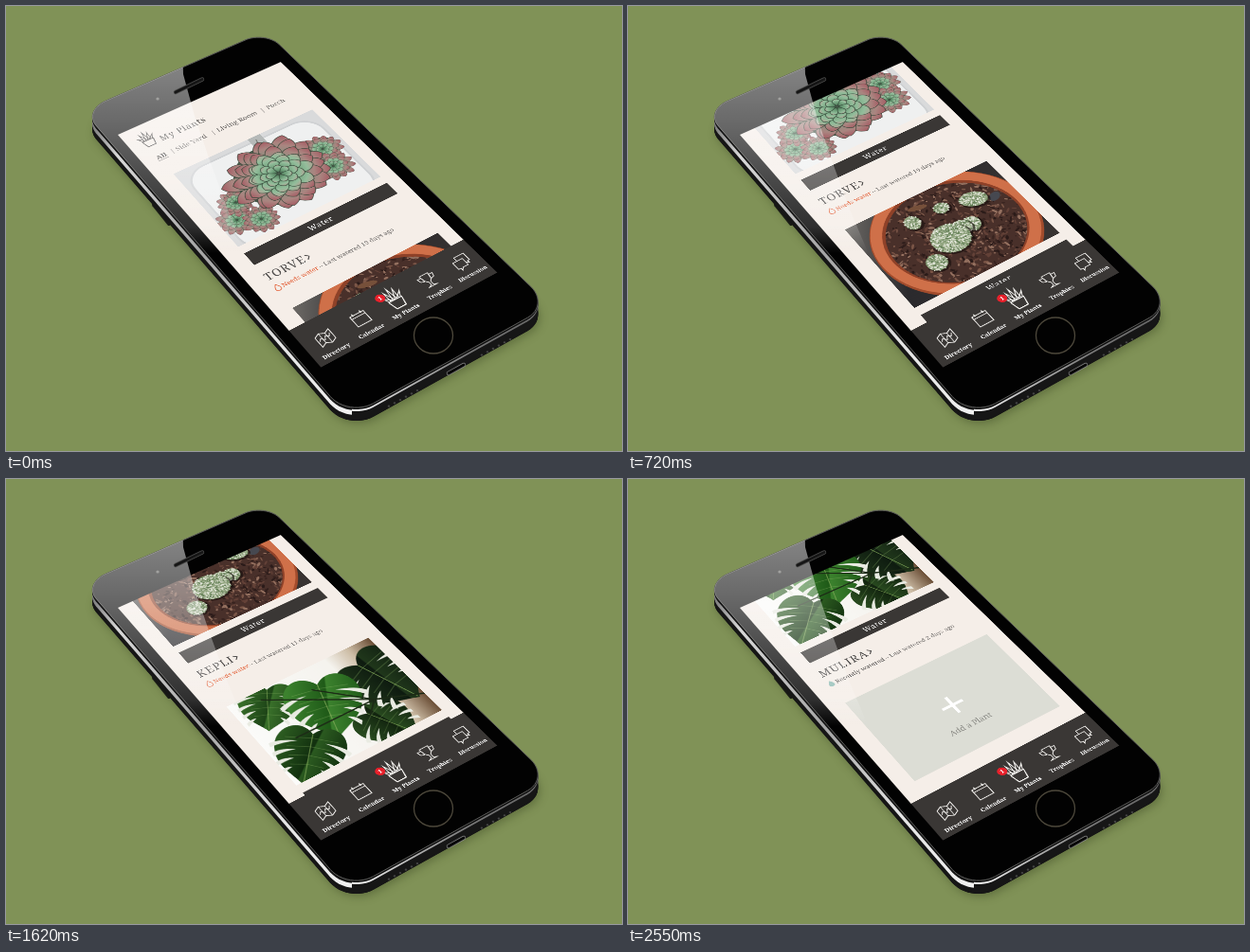
An HTML page with a canvas that plays this animation: 650 px wide and 470 px high, repeating every 2950 ms.

```html
<!DOCTYPE html>
<html lang="en">
<head>
<meta charset="utf-8">
<title>My Plants</title>
<style>
  html, body { margin: 0; width: 100%; height: 100%; overflow: hidden; background: #809257; }
  canvas { position: absolute; left: 0; top: 0; }
  #screen { transform-origin: 0 0; }
</style>
</head>
<body>
<canvas id="phone" width="650" height="470"></canvas>
<canvas id="screen" width="375" height="671"></canvas>
<canvas id="glare" width="650" height="470"></canvas>
<script>
const context = id => document.getElementById(id).getContext('2d');
const phone = context('phone'), screen = context('screen'), glare = context('glare');
const W = 375, H = 667, TAU = Math.PI * 2;
const SERIF = '"Noto Serif", "Liberation Serif", serif';
const PAPER = '#f5eee8', CHARCOAL = '#3a3735', INK = '#4b4948', ORANGE = '#e2592f';

// Perspective from screen units (375 x 667) to the stage.
const m = { a: 185.1 / W, b: 169.9 / H, c: 118, d: -74.3 / W, e: 194.5 / H, f: 136, g: .0451 / W, h: -.1303 / H };
const project = (x, y) => {
  const w = 1 + m.g * x + m.h * y;
  return [(m.a * x + m.b * y + m.c) / w, (m.d * x + m.e * y + m.f) / w];
};
document.getElementById('screen').style.transform =
  `matrix3d(${[m.a, m.d, 0, m.g, m.b, m.e, 0, m.h, 0, 0, 1, 0, m.c, m.f, 0, 1]})`;

let seed = 7;
const random = () => (seed = (seed * 16807) % 2147483647) / 2147483647;
const between = (lo, hi) => lo + random() * (hi - lo);

function ellipse(c, x, y, rx, ry, fill, angle = 0) {
  c.fillStyle = fill;
  c.beginPath();
  c.ellipse(x, y, rx, ry, angle, 0, TAU);
  c.fill();
}

function line(c, points, color, width = 1) {
  c.strokeStyle = color;
  c.lineWidth = width;
  c.beginPath();
  points.forEach(p => c.lineTo(...p));
  c.stroke();
}

function gradient(c, coords, ...stops) {
  const g = c.createLinearGradient(...coords);
  stops.forEach(([at, color]) => g.addColorStop(at, color));
  return g;
}

// ---- phone body ----
function facePath(c, drop = 0) {
  const r = 50, x0 = -22, x1 = 402, y0 = -96, y1 = 778;
  const corners = [[x1 - r, y0 + r, -1], [x1 - r, y1 - r, 0], [x0 + r, y1 - r, 1], [x0 + r, y0 + r, 2]];
  c.beginPath();
  for (const [x, y, quarter] of corners) {
    for (let i = 0; i <= 12; i++) {
      const t = (quarter + i / 12) * Math.PI / 2;
      const [px, py] = project(x + r * Math.cos(t), y + r * Math.sin(t));
      c.lineTo(px, py + drop);
    }
  }
  c.closePath();
}

function drawPhone(c) {
  c.fillStyle = '#809257';
  c.fillRect(0, 0, 650, 470);
  c.lineCap = 'round';
  line(c, [[146, 195], [151, 202]], '#151515', 4);
  line(c, [[156, 210], [172, 230]], '#151515', 4);

  c.save();
  c.shadowColor = 'rgba(50,62,28,.4)';
  c.shadowBlur = 10;
  c.shadowOffsetX = 2;
  c.shadowOffsetY = 3;
  facePath(c, 14);
  c.fillStyle = '#111';
  c.fill();
  c.restore();

  const silver = gradient(c, [90, 0, 560, 0], [0, '#777'], [.06, '#d8d8d8'], [.25, '#a5a5a5'],
    [.42, '#e4e4e4'], [.6, '#f2f2f2'], [.72, '#b5b5b5'], [.85, '#777'], [1, '#666']);
  for (let drop = 14; drop > 0; drop--) {
    facePath(c, drop);
    c.fillStyle = drop > 3 && drop < 9 ? silver : '#161616';
    c.fill();
  }
  // The lower edge shows only a thin bright line above a dark side.
  c.save();
  c.beginPath();
  c.rect(365, 300, 210, 150);
  c.clip();
  for (const [drop, fill] of [[13, '#161616'], [4, silver], [2, '#0c0c0c']]) {
    facePath(c, drop);
    c.fillStyle = fill;
    c.fill();
  }
  c.restore();
  facePath(c);
  c.fillStyle = '#020202';
  c.fill();
  c.strokeStyle = '#5c5c5a';
  c.lineWidth = 1;
  c.stroke();

  c.strokeStyle = '#4d483b';
  c.lineWidth = 1.3;
  c.beginPath();
  c.ellipse(451, 348, 20.5, 19, 0, 0, TAU);
  c.stroke();

  const rimY = x => 384 - .552 * (x - 474);
  line(c, [[467, rimY(467)], [483, rimY(483)]], '#888', 4.4);
  line(c, [[467, rimY(467)], [483, rimY(483)]], '#080808', 3);
  for (let i = 0; i < 6; i++) {
    for (const x of [404 + i * 6, 502 + i * 6]) ellipse(c, x, rimY(x), 1.3, 1.1, '#444');
  }
}

function drawGlare(c) {
  c.save();
  facePath(c);
  c.clip();
  c.fillStyle = gradient(c, [0, 70, 0, 262], [0, 'rgba(255,255,255,.5)'], [.3, 'rgba(255,255,255,.4)'],
    [.6, 'rgba(255,255,255,.28)'], [.85, 'rgba(255,255,255,.18)'], [1, 'rgba(255,255,255,0)']);
  c.beginPath();
  [[186, 30], [187, 72], [199, 116], [215, 163], [234, 215], [254, 262], [60, 262], [60, 30]].forEach(p => c.lineTo(...p));
  c.fill();
  c.restore();
  c.lineCap = 'round';
  line(c, [[179, 91], [207, 77.5]], '#4c4c4b', 4.4);
  line(c, [[179, 91], [207, 77.5]], '#161616', 3);
  ellipse(c, 160, 98, 1.7, 1.6, '#a2a2a0');
}

// ---- plant pictures, 314 x 220 ----
function picture(paint) {
  const canvas = document.createElement('canvas');
  canvas.width = 314;
  canvas.height = 220;
  paint(canvas.getContext('2d'));
  return canvas;
}

function petal(c, length, width, fill) {
  c.beginPath();
  c.moveTo(length * .1, 0);
  c.bezierCurveTo(length * .45, -width * .8, length * .85, -width * 1.5, length, 0);
  c.bezierCurveTo(length * .85, width * 1.5, length * .45, width * .8, length * .1, 0);
  c.fillStyle = fill;
  c.fill();
  c.strokeStyle = 'rgba(48,66,52,.7)';
  c.lineWidth = 1.6;
  c.stroke();
}

function rosette(c, x, y, rx, ry, rings) {
  c.save();
  c.translate(x, y);
  c.scale(rx / 100, ry / 100);
  ellipse(c, 0, 0, 80, 80, '#4b5c4c');
  for (let ring = 0; ring < rings; ring++) {
    const depth = ring / rings, size = 100 * (1 - depth * .9), count = Math.round(13 - depth * 7);
    const outer = depth < .4;
    for (let i = 0; i < count; i++) {
      const length = size * between(.9, 1.06);
      c.save();
      c.rotate((i + ring * .45) / count * TAU);
      petal(c, length, size * 2.6 / count, gradient(c, [0, 0, length, 0], [0, '#46694f'],
        [.45, outer ? '#809480' : '#6a9c76'], [.8, outer ? '#aa8580' : '#93bd9b'], [1, outer ? '#a55c64' : '#b0a394']));
      c.restore();
    }
  }
  c.restore();
}

const succulent = picture(c => {
  c.fillStyle = '#d9dadb';
  c.fillRect(0, 0, 314, 220);
  c.fillStyle = '#eff0f0';
  c.beginPath();
  c.roundRect(12, 12, 290, 235, 45);
  c.fill();
  c.strokeStyle = '#cfd1d3';
  c.lineWidth = 4;
  c.stroke();
  c.fillStyle = '#b5b9b8';
  c.fillRect(164, 0, 28, 45);
  line(c, [[178, 8], [175, 22], [181, 35]], '#70756f', 2);
  for (const [x, y, r] of [[34, 164, 40], [72, 186, 38], [56, 126, 38], [268, 100, 42], [258, 148, 42]]) {
    rosette(c, x, y, r, r * .9, 4);
  }
  rosette(c, 163, 108, 108, 98, 7);
});

function cactus(c, x, y, rx, ry, angle = 0) {
  c.save();
  c.translate(x, y);
  c.rotate(angle);
  ellipse(c, 2, 4, rx + 2, ry + 1, 'rgba(20,12,10,.6)');
  ellipse(c, 0, 0, rx, ry, '#92a580');
  for (let i = 0; i < rx * ry / 3; i++) {
    const t = between(0, TAU), d = Math.sqrt(random());
    ellipse(c, Math.cos(t) * d * rx, Math.sin(t) * d * ry, 2, 1.2, ['#e6e9de', '#cfd6c2', '#637f56'][i % 3], t);
  }
  c.restore();
}

const pot = picture(c => {
  c.fillStyle = gradient(c, [0, 0, 314, 220], [0, '#6d6a66'], [.3, '#2b2a2d'], [1, '#393432']);
  c.fillRect(0, 0, 314, 220);
  ellipse(c, 164, 115, 160, 148, '#a24c2c');
  ellipse(c, 164, 112, 157, 144, '#cf7049');
  ellipse(c, 164, 112, 136, 122, '#8e4128');
  ellipse(c, 164, 114, 131, 117, '#49302a');
  c.save();
  c.beginPath();
  c.ellipse(164, 114, 131, 117, 0, 0, TAU);
  c.clip();
  const soil = ['#2b1b19', '#634137', '#7b5647', '#38231f', '#94705f'];
  for (let i = 0; i < 800; i++) {
    ellipse(c, between(30, 300), between(0, 220), between(1, 7), between(1, 3), soil[i % 5], between(0, 3));
  }
  c.restore();
  ellipse(c, 272, 82, 13, 9, '#464850', -.4);
  ellipse(c, 138, 28, 19, 6, '#76503a', .2);
  cactus(c, 110, 54, 15, 17);
  cactus(c, 174, 52, 15, 13);
  cactus(c, 236, 66, 27, 18, .3);
  cactus(c, 198, 114, 17, 17);
  cactus(c, 176, 112, 20, 18);
  cactus(c, 146, 122, 38, 34);
  cactus(c, 92, 156, 20, 19);
});

function monsteraLeaf(c, x, y, size, angle, dark, light) {
  c.save();
  c.translate(x, y);
  c.rotate(angle);
  c.scale(size / 100, size / 100);
  c.beginPath();
  c.moveTo(0, -62);
  c.bezierCurveTo(45, -120, 110, -65, 90, 5);
  c.bezierCurveTo(78, 60, 30, 80, 0, 110);
  c.bezierCurveTo(-30, 80, -78, 60, -90, 5);
  c.bezierCurveTo(-110, -65, -45, -120, 0, -62);
  c.fillStyle = gradient(c, [-90, 0, 90, 40], [0, light], [.5, dark], [.52, light], [1, dark]);
  c.fill();
  for (const side of [-1, 1]) {
    for (let i = 0; i < 4; i++) {
      const top = -34 + i * 30, reach = 108 - i * 14;
      c.fillStyle = '#e9ebe2';
      c.beginPath();
      c.moveTo(side * 36, top);
      c.quadraticCurveTo(side * reach * .8, top + 2, side * reach, top + 22);
      c.lineTo(side * (reach - 6), top + 34);
      c.quadraticCurveTo(side * reach * .7, top + 12, side * 36, top);
      c.fill();
      line(c, [[0, top - 14], [side * reach * .65, top - 8]], 'rgba(150,190,110,.35)', 2);
    }
  }
  line(c, [[0, -62], [0, 104]], 'rgba(134,173,92,.7)', 2.5);
  c.restore();
}

const monstera = picture(c => {
  c.fillStyle = gradient(c, [0, 0, 314, 0], [0, '#fbfbf9'], [.68, '#f5f3ee'], [.84, '#cdbda6'], [1, '#6c5038']);
  c.fillRect(0, 0, 314, 220);
  monsteraLeaf(c, 64, 36, 58, .55, '#1d4417', '#39702a');
  monsteraLeaf(c, 216, 184, 58, -.5, '#12240f', '#28491f');
  monsteraLeaf(c, 272, 92, 78, -.35, '#0e1b10', '#20371b');
  monsteraLeaf(c, 152, 90, 76, .3, '#1f5a18', '#3c822e');
  monsteraLeaf(c, 62, 170, 68, .75, '#12300f', '#2b5a20');
  for (const [x, y] of [[60, 20], [150, 50], [60, 130], [200, 160]]) {
    line(c, [[314, 170], [230, 132], [x, y]], '#1c2a16', 3);
  }
});

// ---- app screen ----
function text(c, string, x, y, size, color, { weight = 400, spacing = 0, align = 'left' } = {}) {
  c.font = `${weight} ${size}px ${SERIF}`;
  c.letterSpacing = spacing + 'px';
  c.textAlign = align;
  c.fillStyle = color;
  c.fillText(string, x, y);
  return c.measureText(string).width;
}

function plantIcon(c, x, y, scale, color) {
  c.save();
  c.translate(x, y);
  c.scale(scale, scale);
  line(c, [[-13, 4], [13, 4], [9, 22], [-9, 22], [-13, 4]], color, 2);
  for (const [tip, height, base] of [[-17, -8, -7], [-9, -17, -4], [0, -22, 0], [9, -17, 4], [17, -8, 7]]) {
    line(c, [[base - 4, 4], [tip, height], [base + 4, 4]], color, 1.7);
  }
  c.restore();
}

function drop(c, x, y, color, filled) {
  c.beginPath();
  c.moveTo(x, y - 8);
  c.bezierCurveTo(x + 9, y + 3, x + 5, y + 7, x, y + 7);
  c.bezierCurveTo(x - 5, y + 7, x - 9, y + 3, x, y - 8);
  c.fillStyle = c.strokeStyle = color;
  c.lineWidth = 1.3;
  filled ? c.fill() : c.stroke();
}

const cards = [
  { name: 'TORVE', image: succulent, days: '19', top: 149 },
  { name: 'KEPLI', image: pot, days: '11', top: 539 },
  { name: 'MULIRA', image: monstera, days: '2', top: 942, fresh: true },
];
const ADD_BOX_TOP = 1334;

function drawCard(c, { name, image, days, fresh }, y) {
  c.drawImage(image, 33, y);
  c.fillStyle = CHARCOAL;
  c.fillRect(33, y + 239, 314, 33);
  text(c, 'Water', 187, y + 261, 16, '#fff', { weight: 500, spacing: 1, align: 'center' });
  const width = text(c, name, 32, y + 316, 23, INK, { weight: 300, spacing: 1.8 });
  line(c, [[35 + width, y + 302], [41 + width, y + 308], [35 + width, y + 314]], INK, 2);
  drop(c, 38, y + 338, fresh ? '#91bdb6' : ORANGE, fresh);
  const status = fresh ? 'Recently watered' : 'Needs water';
  const end = 47 + text(c, status, 47, y + 343, 12.7, fresh ? INK : ORANGE, { weight: 500 });
  text(c, ` – Last watered ${days} days ago`, end, y + 343, 12.7, '#6a6765');
}

function drawHeader(c, y) {
  plantIcon(c, 40, y + 41, .92, INK);
  text(c, 'My Plants', 61, y + 62, 19, INK, { weight: 500, spacing: 1.3 });
  text(c, 'All', 28, y + 101, 15, INK, { weight: 600 });
  line(c, [[28, y + 105], [50, y + 105]], INK);
  for (const [label, x] of [['|', 59], ['Side Yard', 71], ['|', 150], ['Living Room', 163], ['|', 262], ['Porch', 276]]) {
    text(c, label, x, y + 101, 15, '#6a6765');
  }
}

function drawAddBox(c, y) {
  c.fillStyle = '#dcddd5';
  c.fillRect(33, y, 314, 220);
  line(c, [[168, y + 111], [212, y + 111]], '#fff', 6);
  line(c, [[190, y + 89], [190, y + 133]], '#fff', 6);
  text(c, 'Add a Plant', 190, y + 172, 16, '#8b8b86', { align: 'center' });
}

const icons = [
  (c, s) => {
    line(c, [[-15, -8], [-5, -13], [5, -8], [15, -13], [15, 10], [5, 15], [-5, 10], [-15, 15], [-15, -8]], s, 1.6);
    line(c, [[-5, -13], [-5, 10]], s, 1.4);
    line(c, [[5, -8], [5, 15]], s, 1.4);
    line(c, [[-12, 3], [-8, -2], [-2, 4], [2, -3], [8, 1], [12, -5]], s, 1.4);
  },
  (c, s) => {
    c.strokeStyle = s;
    c.lineWidth = 1.7;
    c.strokeRect(-14, -11, 28, 25);
    line(c, [[-14, -5], [14, -5]], s, 1.5);
    line(c, [[-8, -15], [-8, -9]], s, 2);
    line(c, [[8, -15], [8, -9]], s, 2);
  },
  (c, s) => {
    plantIcon(c, 0, -3, 1.05, s);
    ellipse(c, -20, -15, 9, 9, '#e8202b');
    text(c, '1', -20, -11, 11, '#fff', { weight: 600, align: 'center' });
  },
  (c, s) => {
    line(c, [[-9, -15], [9, -15], [7, -2], [2, 4], [2, 11], [8, 14], [-8, 14], [-2, 11], [-2, 4], [-7, -2], [-9, -15]], s, 1.7);
    line(c, [[-9, -11], [-16, -11], [-14, -3], [-7, -1]], s, 1.5);
    line(c, [[9, -11], [16, -11], [14, -3], [7, -1]], s, 1.5);
  },
  (c, s) => {
    line(c, [[-6, -6], [-6, -15], [15, -15], [15, 3], [11, 3], [11, 8], [6, 3]], s, 1.6);
    line(c, [[-15, -6], [6, -6], [6, 11], [-5, 11], [-10, 16], [-10, 11], [-15, 11], [-15, -6]], s, 1.6);
  },
];

function drawTabs(c) {
  c.fillStyle = CHARCOAL;
  c.fillRect(0, 577, W, 94);
  ['Directory', 'Calendar', 'My Plants', 'Trophies', 'Discussion'].forEach((label, i) => {
    const x = 41 + i * 74.2;
    c.save();
    c.translate(x + 1, 623 - i * 1.5);
    icons[i](c, '#f4f2ef');
    c.restore();
    text(c, label, x, 661 - i * 2, 11.2, '#fff', { weight: 600, align: 'center' });
  });
}

// ---- motion: short ramp up, then steady scrolling, then a hold ----
const LOOP = 2950, STEP = 30, LAST = 2550, SPEED = .434, RAMP = 426;
const scrollAt = t => t < RAMP ? SPEED * t * t / (2 * RAMP) : SPEED * (t - RAMP / 2);

function drawScreen(c, scroll) {
  c.fillStyle = PAPER;
  c.fillRect(0, 0, W, 671);
  drawHeader(c, -scroll);
  cards.forEach(card => drawCard(c, card, card.top - scroll));
  drawAddBox(c, ADD_BOX_TOP - scroll);
  drawTabs(c);
}

function frame() {
  const t = Math.min(Math.floor(performance.now() % LOOP / STEP) * STEP, LAST);
  drawScreen(screen, scrollAt(t));
  requestAnimationFrame(frame);
}

drawPhone(phone);
drawGlare(glare);
frame();
</script>
</body>
</html>
```
